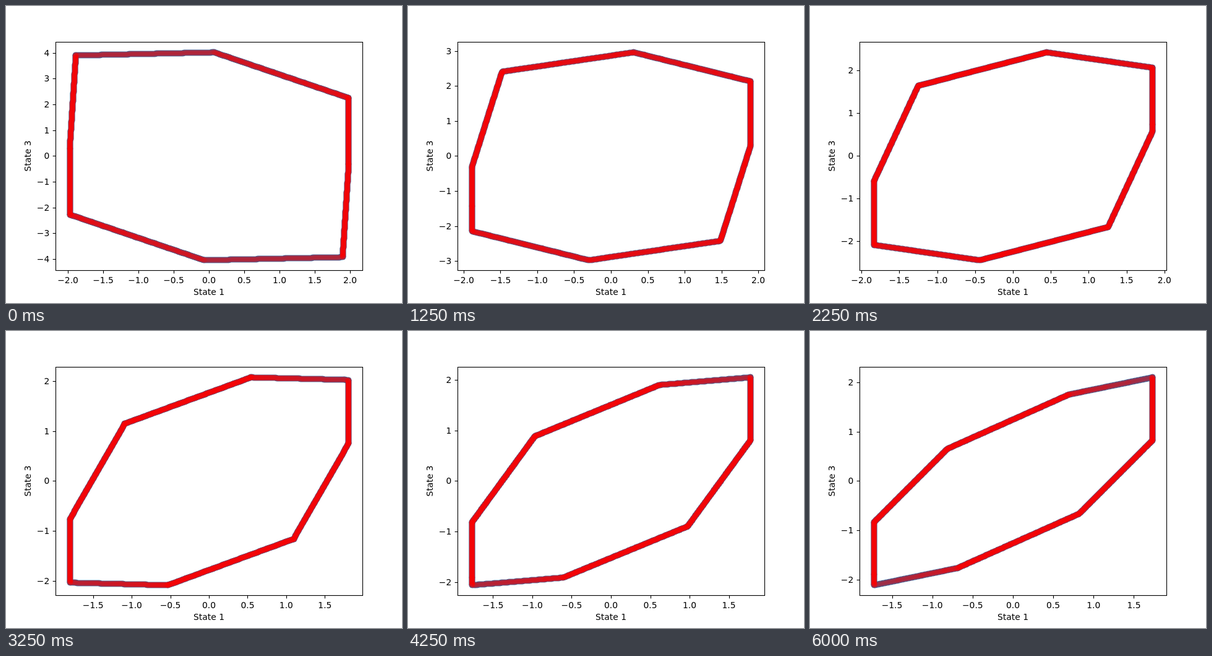
These frames come from a looping animation (640 px wide and 480 px high, 6.25 s). An HTML page with a canvas:

```html
<!DOCTYPE html>
<html lang="en">
<head>
<meta charset="utf-8">
<title>State 1 / State 3</title>
<style>
  html, body { margin: 0; width: 640px; height: 480px; overflow: hidden; background: #fff; }
  canvas, svg { position: absolute; left: 0; top: 0; display: block; }
  text { font: 13.89px "DejaVu Sans", sans-serif; fill: #000; }
  path, rect { fill: none; stroke: #000; stroke-width: 1.11; }
</style>
</head>
<body>
<canvas id="plot" width="640" height="480"></canvas>
<svg width="640" height="480" viewBox="0 0 640 480">
  <rect x="80.5" y="58.5" width="496" height="369"/>
  <g id="ticks"></g>
  <text x="328" y="467" text-anchor="middle">State 1</text>
  <text id="yTitle" text-anchor="middle">State 3</text>
</svg>
<script>
const STEP_MS = 250, STEPS = 25;
const CENTER = { x: 328, y: 242.4 };
const HALF = { x: 225.45, y: 168 };   // pixels from the centre to the data extremes
const RADIUS = 4.86;

// Corner coordinates at a few steps; the other half is the point reflection.
const KEYS = [0, 5, 9, 13, 15, 20, 24];
const TRACKS = {
  ax: [-1.891, -1.483, -1.254, -1.093, -1.028, -0.899, -0.817],
  ay: [3.914, 2.415, 1.654, 1.152, 1.004, 0.770, 0.657],
  bx: [0.070, 0.304, 0.443, 0.540, 0.579, 0.652, 0.691],
  by: [4.034, 2.968, 2.435, 2.077, 1.976, 1.832, 1.756],
  cx: [1.978, 1.8945, 1.842, 1.805, 1.789, 1.7545, 1.730],
  cy: [2.262, 2.138, 2.075, 2.025, 2.036, 2.087, 2.104],
  dy: [-0.300, 0.322, 0.594, 0.764, 0.800, 0.826, 0.834]
};

const ctx = document.getElementById('plot').getContext('2d');
const ticks = document.getElementById('ticks');
const yTitle = document.getElementById('yTitle');
const snap = v => Math.floor(v + 0.5) + 0.5;
const mix = (a, b, t) => a + (b - a) * t;
const clamp = (v, lo, hi) => Math.min(hi, Math.max(lo, v));

// Cubic Hermite curve with parabolic tangents.
function curve(values, k) {
  const last = KEYS.length - 1;
  const gap = i => KEYS[i + 1] - KEYS[i];
  const rate = i => (values[i + 1] - values[i]) / gap(i);
  const tangent = i => {
    const j = clamp(i, 1, last - 1);
    const h0 = gap(j - 1), h1 = gap(j), bend = (rate(j) - rate(j - 1)) / (h0 + h1);
    return rate(j - 1) + bend * (h0 + 2 * (KEYS[i] - KEYS[j]));
  };
  let i = 0;
  while (i < last - 1 && k >= KEYS[i + 1]) i++;
  const h = gap(i), t = (k - KEYS[i]) / h, s = 1 - t;
  return s * s * (1 + 2 * t) * values[i] + t * t * (3 - 2 * t) * values[i + 1]
    + h * t * s * (s * tangent(i) - t * tangent(i + 1));
}

function dot(x, y) {
  ctx.beginPath();
  ctx.arc(snap(x), snap(y), RADIUS, 0, 2 * Math.PI);
  ctx.fill();
}

// Calls visit(x, y, t) about once per pixel between two points.
function walk(p, q, visit) {
  const n = Math.ceil(Math.hypot(q[0] - p[0], q[1] - p[1]));
  for (let i = 0; i <= n; i++) visit(mix(p[0], q[0], i / n), mix(p[1], q[1], i / n), i / n);
}

// How strongly red covers blue at both ends of each side.
function redCover(k) {
  const ab = clamp(0.68 + 0.045 * k, 0, 0.96);
  const bc = k < 11 ? [mix(0.8, 0.92, Math.min(1, k / 9)), 0.9]
                    : [0.93 - 0.006 * (k - 11), 0.72 - 0.011 * (k - 11)];
  return [[0.96, 0.96], [ab, ab], bc, [0.96, 0.96]];
}

function drawOutline(p, sx, sy, k) {
  const half = [[-p.cx, -p.dy], [p.ax, p.ay], [p.bx, p.by], [p.cx, p.cy], [p.cx, p.dy]];
  const sides = visit => {
    for (const sign of [1, -1]) {
      const pts = half.map(([x, y]) => [CENTER.x + sign * x * sx, CENTER.y - sign * y * sy]);
      for (let i = 0; i < 4; i++) walk(pts[i], pts[i + 1], (x, y, t) => visit(x, y, t, i));
    }
  };
  const cover = redCover(k);
  ctx.clearRect(0, 0, 640, 480);
  ctx.globalAlpha = 1;
  ctx.fillStyle = '#1f77b4';
  sides(dot);
  ctx.fillStyle = '#f00';
  sides((x, y, t, i) => {
    ctx.globalAlpha = 1 - Math.pow(1 - mix(cover[i][0], cover[i][1], t), 1 / (2 * RADIUS));
    dot(x, y);
  });
}

function drawTicks(xMax, yMax, sx, sy) {
  const yStep = yMax < 2.041 ? 0.5 : 1;
  const label = (v, digits) => (v < 0 ? '\u2212' : '') + Math.abs(v).toFixed(digits);
  const each = (limit, step, make) => {
    const n = Math.floor(limit / step);
    let out = '';
    for (let i = -n; i <= n; i++) out += make(i * step);
    return out;
  };
  ticks.innerHTML = each(1.1 * xMax, 0.5, v => {
    const x = CENTER.x + v * sx;
    return `<path d="M${snap(x)} 427.5v4.86"/>` +
      `<text x="${x}" y="448" text-anchor="middle">${label(v, 1)}</text>`;
  }) + each(1.1 * yMax, yStep, v => {
    const y = CENTER.y - v * sy;
    return `<path d="M80.5 ${snap(y)}h-4.86"/>` +
      `<text x="70.3" y="${Math.round(y + 5)}" text-anchor="end">${label(v, yStep < 1 ? 1 : 0)}</text>`;
  });
  yTitle.setAttribute('transform', `translate(${yStep < 1 ? 27 : 40} 242.4) rotate(-90)`);
}

function draw(k) {
  const p = {};
  for (const name in TRACKS) p[name] = curve(TRACKS[name], k);
  const yMax = Math.max(p.by, p.cy);
  const sx = HALF.x / p.cx, sy = HALF.y / yMax;
  drawOutline(p, sx, sy, k);
  drawTicks(p.cx, yMax, sx, sy);
}

let shown = -1;
function frame() {
  const k = Math.floor(performance.now() / STEP_MS) % STEPS;
  if (k !== shown) draw(shown = k);
  requestAnimationFrame(frame);
}
frame();
</script>
</body>
</html>
```
